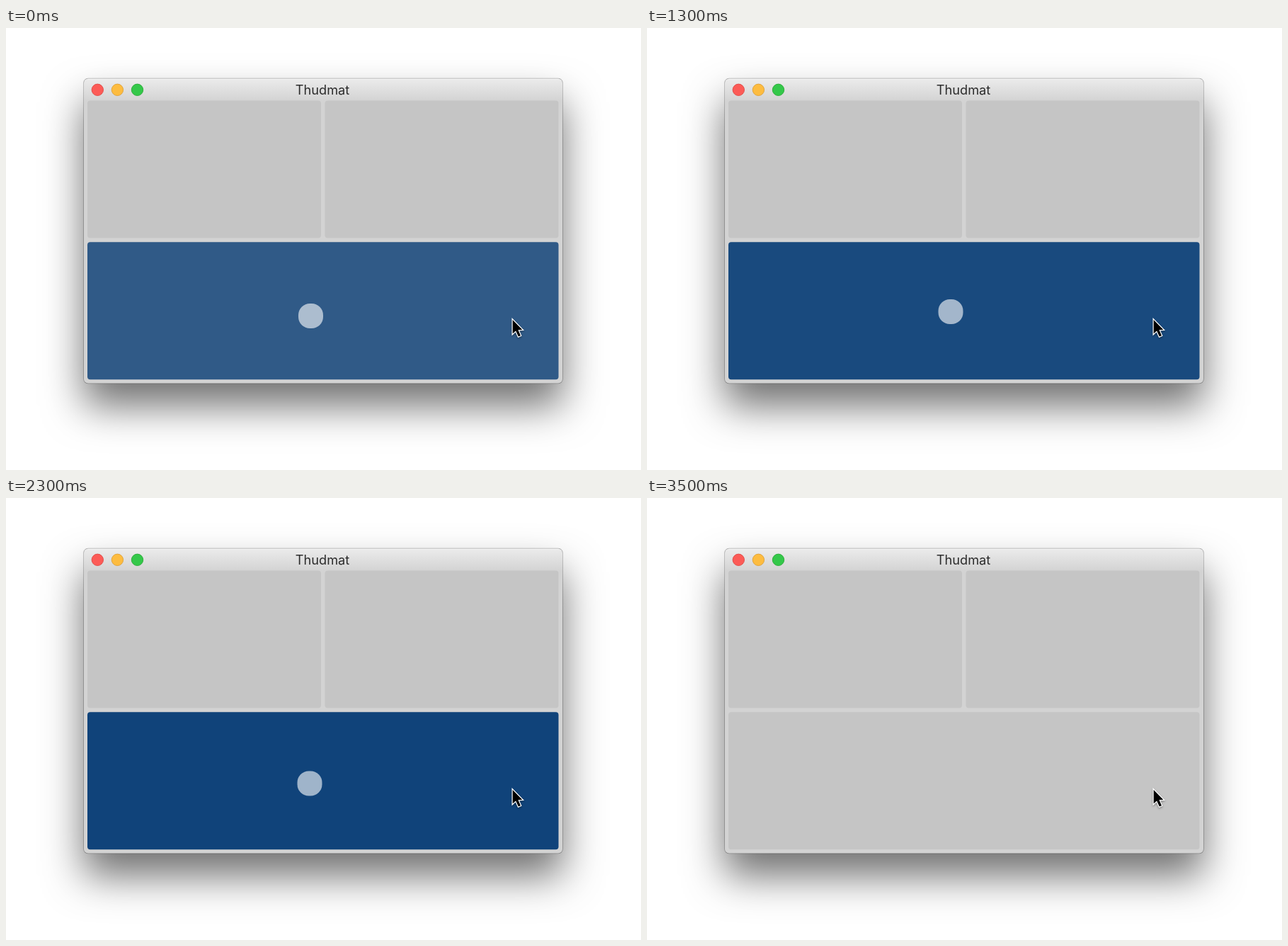
Recreate the animation shown at these times as an HTML page with a canvas. Size 897x624 px, loop 3600 ms.

```html
<!DOCTYPE html>
<html lang="en">
<head>
<meta charset="utf-8">
<title>Thudmat</title>
<style>
html, body { margin: 0; width: 100%; height: 100%; overflow: hidden; background: #fff; }
canvas { display: block; }
</style>
</head>
<body>
<canvas id="stage" width="897" height="624"></canvas>
<script>
const ctx = document.getElementById('stage').getContext('2d');
const LOOP = 3600, STEP = 100;
const GRAY = [197, 197, 197], BLUE = [6, 60, 118];

const pads = {
  left: [115, 102.5, 330, 194],
  right: [450.5, 102.5, 330, 194],
  bottom: [115, 302.2, 665.5, 194]
};

// Each tap: start time, pad, finger position, pressure per step
const taps = [
  { at: 0, pad: 'bottom', x: 430.5, y: 406.5, force: [0.78, 0.9] },
  { at: 400, pad: 'bottom', x: 427, y: 406.5, force: [1, 0.95, 0.78] },
  { at: 800, pad: 'left', x: 254, y: 167.3, force: [0.9, 0.8, 0.74] },
  { at: 1300, pad: 'bottom', x: 429, y: 400.5, force: [0.9, 0.82] },
  { at: 1600, pad: 'left', x: 253, y: 170, force: [0.86, 0.8] },
  { at: 1900, pad: 'bottom', x: 429, y: 402, force: [0.9, 0.82] },
  { at: 2200, pad: 'bottom', x: 429, y: 403, force: [0.84, 0.95, 0.8] },
  { at: 2600, pad: 'left', x: 251, y: 173, force: [0.83, 0.78] },
  { at: 3000, pad: 'left', x: 251, y: 172, force: [0.86, 0.8] }
];

function box(x, y, w, h, r, fill) {
  ctx.beginPath();
  ctx.roundRect(x, y, w, h, r);
  ctx.fillStyle = fill;
  ctx.fill();
}

function mix(a, b, k) {
  return `rgb(${a.map((v, i) => Math.round(v + (b[i] - v) * k))})`;
}

function drawLight(x, fill, line) {
  ctx.beginPath();
  ctx.arc(x, 87.3, 8.2, 0, Math.PI * 2);
  ctx.fillStyle = fill;
  ctx.fill();
  ctx.strokeStyle = line;
  ctx.lineWidth = 0.9;
  ctx.stroke();
}

function drawWindow() {
  ctx.fillStyle = '#fff';
  ctx.fillRect(0, 0, 897, 624);

  ctx.save();
  ctx.shadowColor = 'rgba(0,0,0,.56)';
  ctx.shadowBlur = 56;
  ctx.shadowOffsetY = 32;
  box(110, 71.5, 676, 430, 6, '#d3d3d3');
  ctx.restore();

  box(109.3, 70.8, 677.4, 431.4, 6.5, 'rgba(0,0,0,.3)');
  const bar = ctx.createLinearGradient(0, 72, 0, 103);
  bar.addColorStop(0, '#ebebeb');
  bar.addColorStop(1, '#d3d3d3');
  box(110, 71.5, 676, 430, 6, bar);
  ctx.fillStyle = '#f4f4f4';
  ctx.fillRect(115, 71.8, 666, 1);

  drawLight(129.3, '#fc5b57', '#df4843');
  drawLight(157.4, '#fdbc40', '#dea035');
  drawLight(185.5, '#34c84a', '#27a934');

  ctx.font = '18.2px Inter, Roboto, sans-serif';
  ctx.textAlign = 'center';
  ctx.fillStyle = '#2c2c2c';
  ctx.fillText('Thudmat', 447, 94);
}

function drawCursor() {
  ctx.save();
  ctx.beginPath();
  ctx.moveTo(715.7, 412);
  for (const [x, y] of [[715.7, 431.6], [720.1, 427.4], [723.8, 435.6],
                        [727, 434.2], [723.4, 426.2], [729.3, 426]]) ctx.lineTo(x, y);
  ctx.closePath();
  ctx.shadowColor = 'rgba(0,0,0,.35)';
  ctx.shadowBlur = 3;
  ctx.shadowOffsetY = 1.5;
  ctx.strokeStyle = '#fff';
  ctx.lineWidth = 2.4;
  ctx.stroke();
  ctx.shadowColor = 'transparent';
  ctx.fillStyle = '#000';
  ctx.fill();
  ctx.restore();
}

function draw(t) {
  drawWindow();
  const tap = taps.find(h => t >= h.at && t < h.at + h.force.length * STEP);
  for (const name in pads) {
    const k = tap && tap.pad === name ? tap.force[(t - tap.at) / STEP] : 0;
    box(...pads[name], 4, mix(GRAY, BLUE, k));
  }
  if (tap) box(tap.x - 17.5, tap.y - 17.5, 35, 35, 16.3, 'rgba(255,255,255,.6)');
  drawCursor();
}

const start = performance.now();
let shown = -1;
function tick() {
  const t = Math.floor((performance.now() - start) % LOOP / STEP) * STEP;
  if (t !== shown) draw(shown = t);
  requestAnimationFrame(tick);
}
tick();
</script>
</body>
</html>
```
